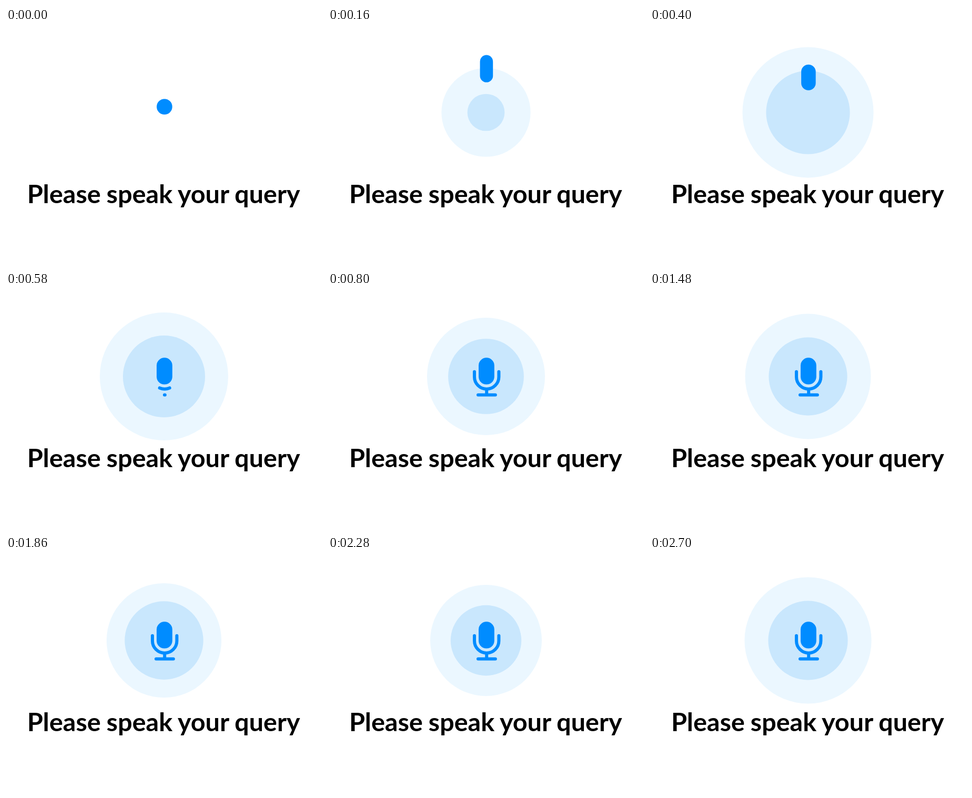
Animation, 600 px wide and 450 px high, one loop 2.72 s. Source, as an HTML page:

```html
<!DOCTYPE html>
<html lang="en">
<head>
<meta charset="utf-8">
<title>Voice query</title>
<style>
  html, body { margin: 0; width: 100%; height: 100%; overflow: hidden; background: #fff; }
  svg { display: block; width: 100%; height: 100%; }
  text { font: 700 48.5px Lato, sans-serif; word-spacing: -.8px; text-anchor: middle; }
  .line { fill: none; stroke: #008cff; stroke-width: 6; stroke-linecap: round; }
</style>
</head>
<body>
<svg viewBox="0 0 600 450">
  <rect width="600" height="450" fill="#fff"/>
  <circle id="outer" cx="300" cy="161" fill="#ebf7ff"/>
  <circle id="inner" cx="300" cy="161" fill="#c9e7fd"/>
  <path id="left" class="line" pathLength="1" d="M301.2 185A23.2 23.2 0 0 1 278 161.8V152"/>
  <path id="right" class="line" pathLength="1" d="M301.2 185A23.2 23.2 0 0 0 324.4 161.8V152"/>
  <path id="stem" class="line" style="stroke-linecap:butt"/>
  <path id="base" class="line"/>
  <rect id="pill" fill="#008cff"/>
  <text x="299.3" y="334">Please speak your query</text>
</svg>
<script>
const LOOP = 2720;
const $ = id => document.getElementById(id);
const set = (id, attrs) => {
  for (const k in attrs) $(id).setAttribute(k, attrs[k]);
};
const clamp = x => Math.min(1, Math.max(0, x));
const linear = x => x;
const sine = x => (1 - Math.cos(Math.PI * x)) / 2;
const outPow = n => x => 1 - (1 - x) ** n;

// keys: [time, value, easing into this key]
function track(keys, t) {
  if (t <= keys[0][0]) return keys[0][1];
  for (let i = 1; i < keys.length; i++) {
    const [t0, v0] = keys[i - 1], [t1, v1, ease = sine] = keys[i];
    if (t < t1) return v0 + (v1 - v0) * ease((t - t0) / (t1 - t0));
  }
  return keys[keys.length - 1][1];
}

const outerR = [[37, 0], [430, 124.5, outPow(3)], [1080, 104], [1580, 121], [2080, 101], [2680, 120.5]];
const innerR = [[73, 0], [420, 79.8, outPow(2)], [1080, 67], [1680, 77], [2240, 67], [2730, 75.6]];
const pillW = [[0, 29.6], [160, 24.6, linear], [400, 27.5, linear], [540, 29.8, linear]];
const pillH = [[0, 29.6], [160, 52, outPow(2)], [400, 49], [540, 51]];

// ballistic jump that lands after 509 ms
const jump = t => t < 509 ? 0.001307 * t * (t - 509) : 0;

function draw(t) {
  set('outer', { r: track(outerR, t) });
  set('inner', { r: track(innerR, t) });

  const w = track(pillW, t), h = track(pillH, t);
  set('pill', { x: 300.9 - w / 2, y: 150.8 + jump(t) - h / 2, width: w, height: h, rx: w / 2 });

  const arm = sine(clamp((t - 520) / 200));
  const foot = sine(clamp((t - 560) / 200));
  for (const id of ['left', 'right'])
    set(id, { 'stroke-dasharray': arm + ' 2', visibility: arm ? 'visible' : 'hidden' });
  set('stem', { d: `M301.2 185V${185 + 11 * foot}`, visibility: foot ? 'visible' : 'hidden' });
  set('base', { d: `M${301.4 - 16.4 * foot} 196.3H${301.4 + 16.4 * foot}`, visibility: foot ? 'visible' : 'hidden' });
}

const start = performance.now();
function tick() {
  draw((performance.now() - start) % LOOP);
  requestAnimationFrame(tick);
}
draw(0);
requestAnimationFrame(tick);
</script>
</body>
</html>
```
